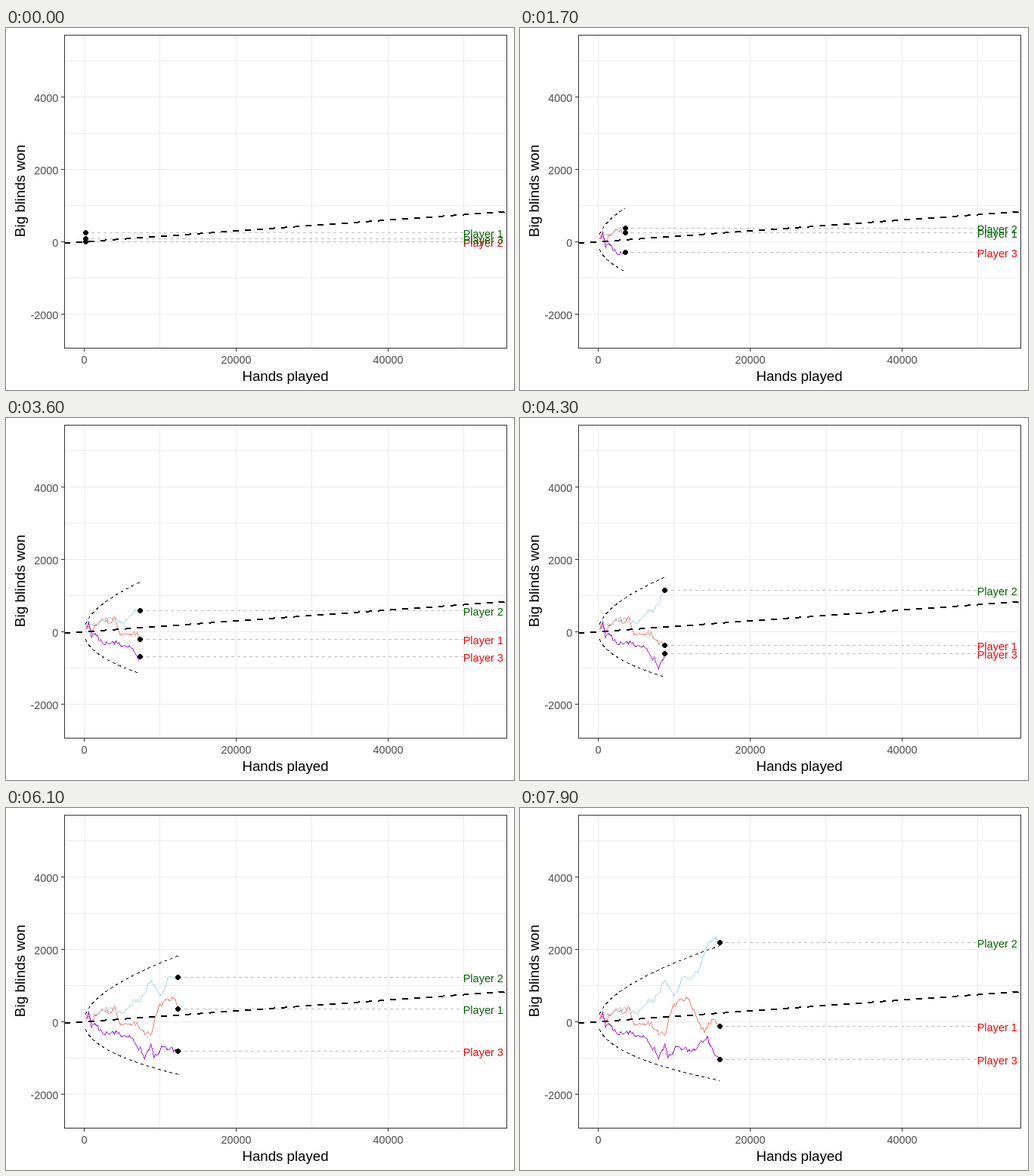
Recreate the animation shown at these times as an HTML page. Size 672 by 480 pixels, loop 8 s.

```html
<!DOCTYPE html>
<html lang="en">
<head>
<meta charset="utf-8">
<title>Big blinds won by hands played</title>
<style>
  html, body { margin: 0; width: 672px; height: 480px; overflow: hidden; background: #fff; }
  svg { display: block; font-family: "Liberation Sans", Arial, sans-serif; }
  .tick { font-size: 14.4px; fill: #4d4d4d; }
  .title { font-size: 18.67px; text-anchor: middle; }
  .name { font-size: 14.5px; }
  path, line, rect, circle { shape-rendering: crispEdges; }
  path, line, rect { fill: none; }
</style>
</head>
<body>
<svg id="chart" width="672" height="480" viewBox="0 0 672 480"></svg>
<script>
const chart = document.getElementById('chart');
const STEP = 100, STEPS = 80, HANDS = 200;
const px = hands => 103.2 + hands * 0.01005;
const py = won => 283.5 - won * 0.04795;
const snap = v => Math.floor(v) + 0.5;
const hands = k => (k + 1) * HANDS;
const mean = n => 0.015 * n;
const spread = n => 14.72 * Math.sqrt(n);

function random(seed) {
  return () => (seed = seed * 16807 % 2147483647) / 2147483647;
}

// Winnings per step: straight runs between turning points, roughened in between
function walk(seed, turns) {
  const rand = random(seed), won = [];
  turns.forEach(([b, w], i) => {
    const [a, v] = turns[Math.max(0, i - 1)];
    for (let k = a + 1; k < b; k++) won[k] = v + (w - v) * (k - a) / (b - a) + 140 * (rand() - 0.5);
    won[b] = w;
  });
  return won;
}

const players = [
  { name: 'Player 1', color: '#fa8072', won: walk(11, [
    [0, 250], [4, 50], [11, 360], [17, 240], [19, 430], [22, 10], [25, -85], [34, -20], [36, -210],
    [43, -365], [48, 400], [51, 540], [58, 655], [61, 355], [69, -300], [74, 70], [79, -125]]) },
  { name: 'Player 2', color: '#add8e6', won: walk(23, [
    [0, -2], [2, 320], [4, 200], [17, 375], [25, 210], [32, 620], [36, 585], [43, 1150],
    [49, 720], [51, 815], [55, 1240], [61, 1230], [65, 1400], [71, 2140], [77, 2300], [79, 2190]]) },
  { name: 'Player 3', color: '#a020f0', won: walk(37, [
    [0, 83], [2, 260], [4, -155], [7, -90], [11, -300], [17, -290], [25, -375], [31, -450],
    [35, -780], [36, -690], [39, -1030], [43, -615], [45, -990], [51, -690], [61, -815],
    [71, -400], [75, -850], [79, -1040]]) }
];

function set(el, attrs) {
  for (const key in attrs) el.setAttribute(key, attrs[key]);
}
function add(tag, attrs, text) {
  const el = document.createElementNS('http://www.w3.org/2000/svg', tag);
  set(el, attrs);
  if (text) el.textContent = text;
  return chart.appendChild(el);
}
function rule(x1, y1, x2, y2, stroke) {
  return add('line', { x1, y1, x2, y2, stroke });
}

// Grid and axes
for (let n = 0; n <= 50000; n += 10000) rule(snap(px(n)), 10, snap(px(n)), 424, '#ebebeb');
for (let w = -2000; w <= 5000; w += 1000) rule(78, snap(py(w)), 662, snap(py(w)), '#ebebeb');
for (let n = 0; n <= 40000; n += 20000) {
  const x = snap(px(n));
  rule(x, 425, x, 429, '#333');
  add('text', { class: 'tick', x, y: 445, 'text-anchor': 'middle' }, String(n));
}
for (let w = -2000; w <= 4000; w += 2000) {
  const y = snap(py(w));
  rule(73, y, 77, y, '#333');
  add('text', { class: 'tick', x: 69.3, y: y + 6, 'text-anchor': 'end' }, String(w));
}
add('text', { class: 'title', x: 369.5, y: 468 }, 'Hands played');
add('text', { class: 'title', style: 'font-size:19px', transform: 'translate(25 216) rotate(-90)' }, 'Big blinds won');

// Moving parts, from back to front
for (const p of players) p.guide = add('line', { x2: 605, stroke: '#bebebe', 'stroke-dasharray': '4 4' });
for (const p of players) p.line = add('path', { stroke: p.color });
const bounds = [1, -1].map(side => ({
  side, el: add('path', { stroke: '#000', 'stroke-dasharray': '4 4' })
}));
add('line', { x1: 77, y1: py(mean(-2600)), x2: 662, y2: py(mean(55600)),
  stroke: '#000', 'stroke-width': 2, 'stroke-dasharray': '8 8' });
for (const p of players) p.dot = add('circle', { r: 3.3 });
for (const p of players) p.label = add('text', { class: 'name', x: 604.7 }, p.name);
add('rect', { x: 77.5, y: 9.5, width: 585, height: 415, stroke: '#333' });

function trace(last, won) {
  let d = '';
  for (let k = 0; k <= last; k++) {
    d += (k ? 'L' : 'M') + px(hands(k)).toFixed(2) + ' ' + py(won(k)).toFixed(2);
  }
  return d;
}

function draw(k) {
  const x = px(hands(k));
  for (const p of players) {
    const won = p.won[k], y = py(won);
    set(p.line, { d: trace(k, i => p.won[i]) });
    set(p.guide, { x1: x, y1: snap(y), y2: snap(y) });
    set(p.dot, { cx: snap(x), cy: snap(y) });
    set(p.label, { y: snap(y) + 6, fill: won < 0 ? '#f00' : '#006400' });
  }
  for (const { side, el } of bounds) {
    set(el, { d: trace(k, i => mean(hands(i)) + side * spread(hands(i))) });
  }
}

const start = performance.now();
let shown = -1;
function tick(now) {
  const k = Math.floor(Math.max(0, now - start) / STEP) % STEPS;
  if (k !== shown) draw(shown = k);
  requestAnimationFrame(tick);
}
tick(start);
</script>
</body>
</html>
```
